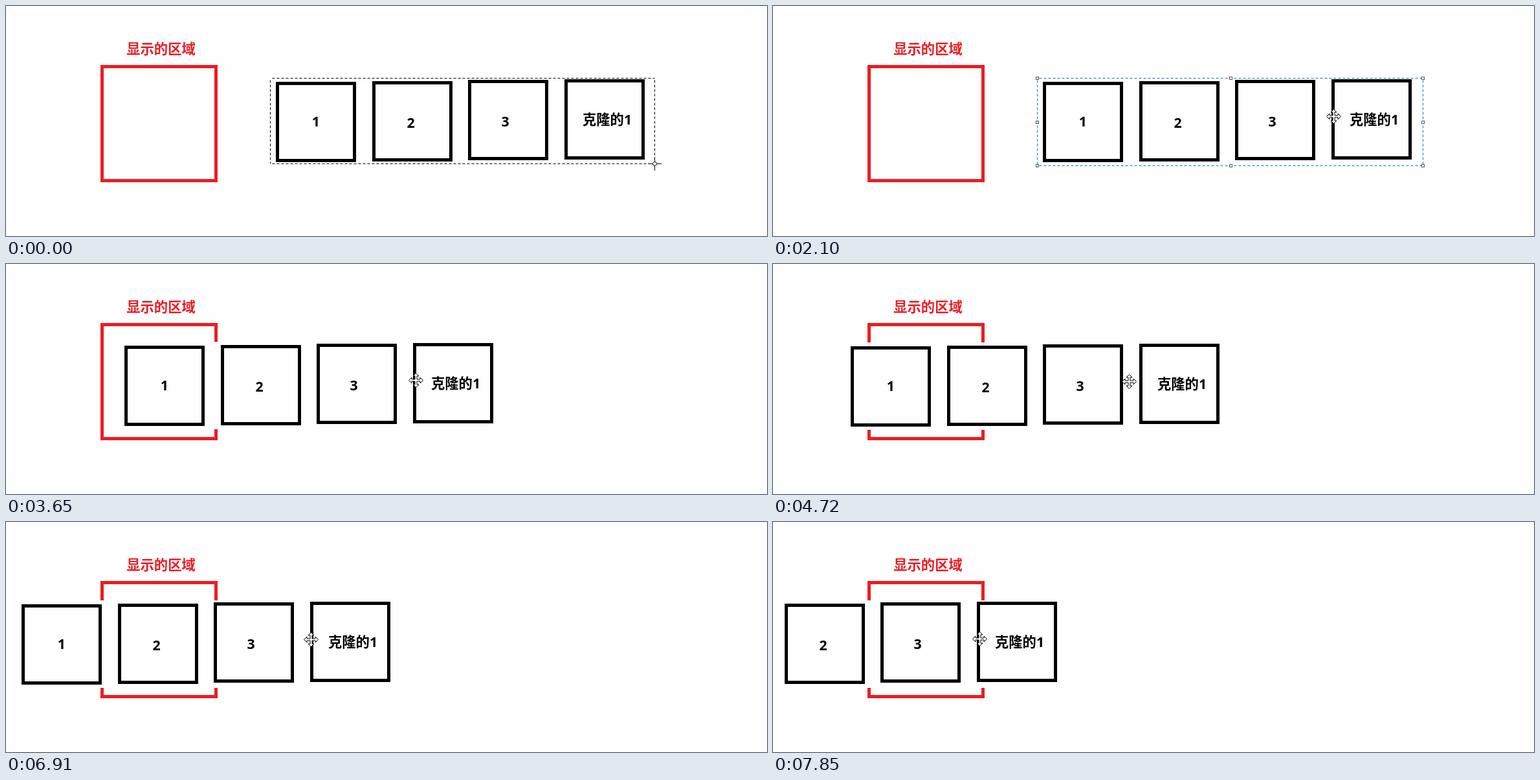
An HTML page for the animation above (8 s loop, 1176x355 px).

```html
<!DOCTYPE html>
<html lang="zh-CN">
<head>
<meta charset="utf-8">
<title>轮播示意</title>
<style>
  html, body { margin: 0; width: 100%; height: 100%; overflow: hidden; background: #fefefe; }
  svg { display: block; width: 1176px; height: 355px; }
  text { font: bold 21.3px "Open Sans", "Noto Sans CJK SC", "Noto Sans CJK", sans-serif; }
  .middle { text-anchor: middle; }
  .frame { fill: none; stroke-width: 5; }
  .line { fill: none; stroke-width: 1; }
  .handle { fill: #fff; stroke: #555; }
</style>
</head>
<body>
<svg viewBox="0 0 1176 355">
  <text class="middle" x="239.5" y="73.5" fill="#ed1c24">显示的区域</text>
  <rect class="frame" x="148.5" y="93.5" width="176" height="176" stroke="#ed1c24"/>
  <g id="strip">
    <rect x="409" y="111" width="595" height="135" fill="#fefefe"/>
    <g id="cards"></g>
  </g>
  <path id="marquee" class="line" stroke-dasharray="4 3" stroke-dashoffset="4"/>
  <g id="handles"></g>
  <g id="cross" class="line" stroke="#000">
    <path d="M-10.5 0H-3M3 0H10.5M0-10.5V-3M0 3V10.5"/>
    <circle r="3" fill="#fff"/>
  </g>
  <path id="mover" fill="#fff" stroke="#000" stroke-width="1" stroke-linejoin="round"/>
</svg>
<script>
const LOOP = 8000, LEFT = 408, TOP = 111;
const RELEASE = 1833, HOVER = 1887, DRAG = 2720;
const $ = id => document.getElementById(id);

const ease = {
  linear: p => p,
  in: p => p ** 1.3,
  out: p => 1 - (1 - p) ** 2,
  inOut: p => p * p * (3 - 2 * p)
};

// [time, x, y] of the dragged selection corner
const corners = [
  [0, 1002, 243], [60, 1003, 243], [620, 1003, 242], [860, 1003, 241],
  [1230, 1003, 242], [1290, 1003, 243], [1350, 1003, 244], [1410, 1003, 245],
  [1780, 1004, 246]
];

// [start, end, steps, x, y, easing, extra dip in y]: strip offset reached at the end
const moves = [
  [2720, 2960, 6, -98, 10, "in"],
  [2960, 3510, 12, -217, 12, "linear"],
  [3560, 3650, 3, -234, 9, "out"],
  [4460, 4950, 12, -380, 12, "inOut"],
  [5130, 5290, 3, -384, 12, "linear"],
  [5530, 5730, 5, -389, 12, "out"],
  [5920, 6140, 6, -393, 10, "linear"],
  [6910, 7700, 19, -517, 10, "in", 7],
  [7760, 7850, 3, -548, 10, "linear"]
];

const cards = [
  [417, 117, "1", 478.8, 186], [566, 116, "2", 625.5, 188],
  [714, 114, "3", 771.5, 186], [863, 113, "克隆的1", 891, 183]
];
$("cards").innerHTML = cards.map(([x, y, label, tx, ty]) =>
  `<rect class="frame" x="${x + 2.5}" y="${y + 2.5}" width="119" height="119" stroke="#000"/>
   <text class="${label.length > 1 ? "" : "middle"}" x="${tx}" y="${ty}">${label}</text>`).join("");

$("handles").innerHTML = [408, 707, 1004].flatMap(x => [111, 179, 246].map(y =>
  x === 707 && y === 179 ? "" :
  `<rect class="handle" x="${x - 1.5}" y="${y - 1.5}" width="4" height="4"/>`)).join("");

// One arm of the four-way arrow, turned by quarters
const arm = [[0, -11], [4.5, -6.5], [1.5, -6.5], [1.5, -1.5], [6.5, -1.5], [6.5, -4.5]];
const turn = ([x, y], n) => n ? turn([-y, x], n - 1) : [x, y];
$("mover").setAttribute("d",
  "M" + [0, 1, 2, 3].flatMap(n => arm.map(p => turn(p, n))).join("L") + "Z");

const latest = (rows, t) => rows.findLastIndex(row => row[0] <= t);
const place = (el, x, y) => el.setAttribute("transform", `translate(${x} ${y})`);
const show = (el, on) => el.setAttribute("visibility", on ? "visible" : "hidden");

// Strip offset at t; the pointer runs `lead` steps ahead
function offset(t, lead) {
  const i = latest(moves, t);
  if (i < 0) return [0, 0];
  const [start, end, steps, x, y, easing, dip = 0] = moves[i];
  const [, , , x0, y0] = moves[i - 1] || [0, 0, 0, 0, 0];
  const step = Math.floor((t - start) / (end - start) * (steps - 1) + 1e-6) + lead;
  const p = Math.min(1, step / (steps - 1)), e = ease[easing](p);
  return [x0 + (x - x0) * e, y0 + (y - y0) * e + dip * Math.sin(Math.PI * p)].map(Math.round);
}

function pointer(t) {
  if (t >= 2290) {
    const [x, y] = offset(t, 1);
    return [867.5 + x, 170.5 + y];
  }
  const p = Math.min(1, (Math.floor((t - HOVER) / 53.25) + 1) / 5), e = ease.out(p);
  return [1004.5 - Math.round(138 * e), 246.5 - Math.round(76 * e)];
}

function draw(t) {
  const [, x, y] = corners[latest(corners, t)];
  const right = x + .5, bottom = y + .5, left = LEFT + .5, top = TOP + .5;
  const marquee = $("marquee");
  marquee.setAttribute("d",
    `M${left} ${top}H${right}M${left} ${top}V${bottom}M${right} ${top}V${bottom}M${left} ${bottom}H${right}`);
  marquee.setAttribute("stroke", t < RELEASE ? "#000" : "#0078d7");
  show(marquee, t < DRAG);
  show($("handles"), t >= RELEASE && t < DRAG);
  show($("cross"), t < HOVER);
  show($("mover"), t >= HOVER);
  place($("cross"), right, bottom);
  place($("mover"), ...pointer(t));
  place($("strip"), ...offset(t, 0));
}

const begin = performance.now();
function tick() {
  draw((performance.now() - begin) % LOOP);
  requestAnimationFrame(tick);
}
tick();
</script>
</body>
</html>
```
